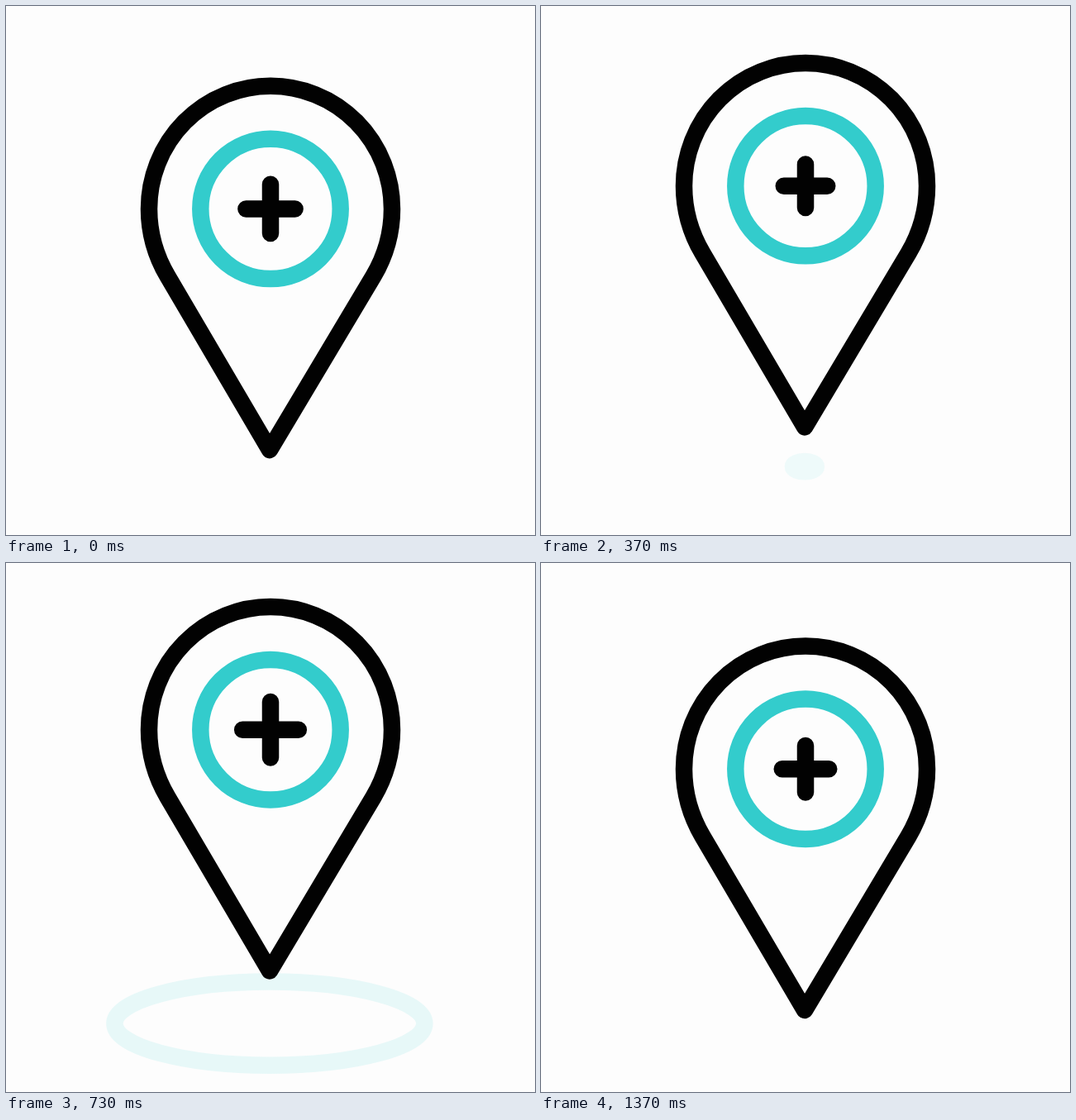
Write an HTML page with a canvas that moves like this. It is 640 px wide and 640 px high and loops after 1.67 s.

```html
<!DOCTYPE html>
<html lang="en">
<head>
<meta charset="utf-8">
<title>Map pin</title>
<style>
  html, body { margin: 0; width: 100%; height: 100%; overflow: hidden; background: #fdfdfd; }
  canvas { display: block; width: 100vmin; height: 100vmin; }
</style>
</head>
<body>
<canvas id="stage" width="640" height="640"></canvas>
<script>
const ctx = document.getElementById('stage').getContext('2d');
const LOOP = 1670, STEP = 100 / 3, LAST = 49;
const PAPER = '#fdfdfd', INK = '#020202', TEAL = '#33cccc';
const CENTER_X = 320, REST_Y = 249.3, STROKE = 20.5;

// Keys are [frame, value], eased in and out between neighbours.
const LIFT = [[-1.1, 0], [5.6, 54], [8.3, 54], [14.4, 0], [20.6, 54], [27.1, 0]];
const PLUS = [[-1.1, 38.5], [5.6, 57.1], [11.2, 36.4], [19.6, 38.5],
              [26.2, 57.1], [31.8, 36.4], [41, 38.5]];
const RIPPLE_SIZE = [[0, 11], [13.25, 192]];
const RIPPLE_ALPHA = [[0, 0], [6.2, 1], [8, 1], [13, 0]];
const RIPPLE_STARTS = [10, 23];

function valueAt(keys, frame) {
  if (frame <= keys[0][0]) return keys[0][1];
  for (let i = 1; i < keys.length; i++) {
    const [from, a] = keys[i - 1], [to, b] = keys[i];
    if (frame < to) {
      const x = (frame - from) / (to - from);
      return a + (b - a) * x * x * (3 - 2 * x);
    }
  }
  return keys[keys.length - 1][1];
}

function strokeEllipse(x, y, rx, ry) {
  ctx.strokeStyle = TEAL;
  ctx.beginPath();
  ctx.ellipse(x, y, rx, ry, 0, 0, 2 * Math.PI);
  ctx.stroke();
}

function drawRipple(age) {
  const alpha = valueAt(RIPPLE_ALPHA, age);
  if (alpha <= 0) return;
  const rx = valueAt(RIPPLE_SIZE, age);
  ctx.globalAlpha = alpha;
  strokeEllipse(318.9, 557.2, rx, 2.6 + 0.256 * rx);
  ctx.globalAlpha = 1;
}

function drawPin(y, plusReach) {
  ctx.save();
  ctx.translate(CENTER_X, y);
  ctx.fillStyle = PAPER;
  ctx.strokeStyle = INK;
  ctx.beginPath();
  ctx.moveTo(-1, 291.7);
  ctx.lineTo(-124.5, 81.5);
  ctx.bezierCurveTo(-139.7, 55.6, -147, 29.5, -147, 0);
  ctx.ellipse(0, 0, 147, 148.7, 0, Math.PI, 2 * Math.PI);
  ctx.bezierCurveTo(147, 29.5, 139.7, 55.6, 124.5, 81.5);
  ctx.closePath();
  ctx.fill();
  ctx.stroke();

  strokeEllipse(0, 0, 84.7, 84.7);

  const arm = plusReach - STROKE / 2;
  ctx.strokeStyle = INK;
  ctx.beginPath();
  ctx.moveTo(-arm, 0);
  ctx.lineTo(arm, 0);
  ctx.moveTo(0, -arm);
  ctx.lineTo(0, arm);
  ctx.stroke();
  ctx.restore();
}

function draw(now) {
  const frame = Math.min(LAST, Math.floor((now % LOOP + 4) / STEP));
  ctx.fillStyle = PAPER;
  ctx.fillRect(0, 0, 640, 640);
  ctx.lineWidth = STROKE;
  ctx.lineCap = ctx.lineJoin = 'round';
  for (const start of RIPPLE_STARTS) drawRipple(frame - start);
  drawPin(REST_Y - valueAt(LIFT, frame), valueAt(PLUS, frame));
}

let startTime;
function tick(now) {
  startTime ??= now;
  draw(now - startTime);
  requestAnimationFrame(tick);
}
draw(0);
requestAnimationFrame(tick);
</script>
</body>
</html>
```
